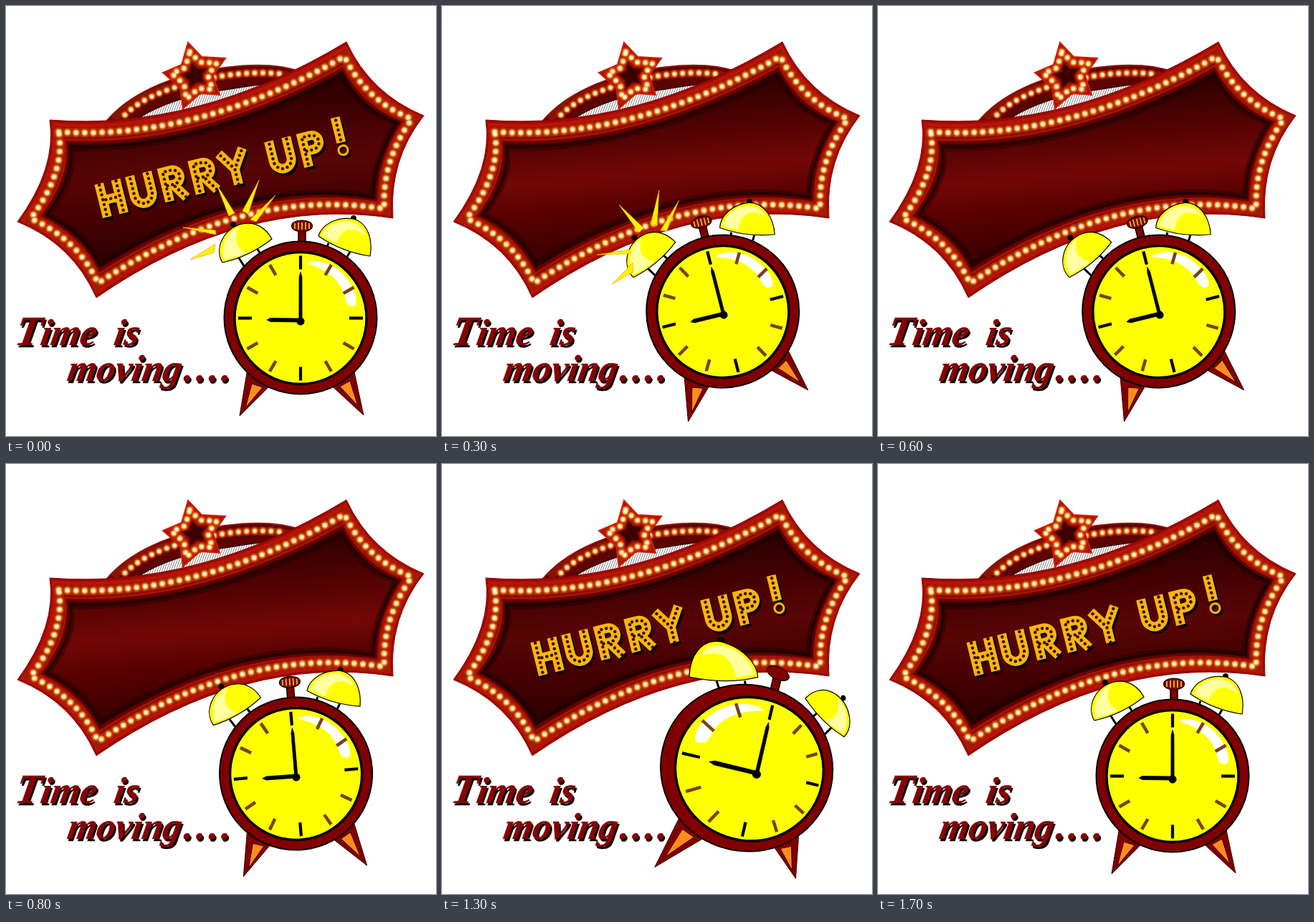
Animation of 600x600 px, one loop 1800 ms. Source, as an HTML page:

```html
<!DOCTYPE html>
<html lang="en">
<head>
<meta charset="utf-8">
<title>Hurry up</title>
<style>
html, body { margin: 0; width: 100%; height: 100%; overflow: hidden; background: #fff; }
svg { display: block; width: 100vw; height: 100vh; }
.script { font: italic bold 52px "Liberation Serif", serif; stroke-width: .5; }
.cap { font-size: 58px; }
</style>
</head>
<body>
<svg id="stage" viewBox="0 0 600 600">
  <defs>
    <linearGradient id="lit" x1="0.4" y1="0" x2="0.55" y2="1">
      <stop offset="0" stop-color="#240000"/>
      <stop offset=".3" stop-color="#500202"/>
      <stop offset=".52" stop-color="#730707"/>
      <stop offset=".7" stop-color="#560000"/>
      <stop offset="1" stop-color="#300000"/>
    </linearGradient>
    <linearGradient id="dim" x1="0.4" y1="0" x2="0.55" y2="1">
      <stop offset="0" stop-color="#220000"/>
      <stop offset=".3" stop-color="#440101"/>
      <stop offset=".5" stop-color="#580505"/>
      <stop offset=".7" stop-color="#460000"/>
      <stop offset="1" stop-color="#260000"/>
    </linearGradient>
    <pattern id="hatch" width="3" height="3" patternUnits="userSpaceOnUse" patternTransform="rotate(20)">
      <rect width="3" height="3" fill="#fff"/>
      <rect width="1" height="3" fill="#888"/>
    </pattern>
  </defs>
  <g id="sign"></g>
  <g id="word" role="img" aria-label="HURRY UP !" transform="translate(135.5 296) rotate(-14)"></g>
  <g id="caption"></g>
  <g id="clock" stroke-linejoin="round"></g>
</svg>
<script>
const $ = id => document.getElementById(id);
const path = (d, fill = 'none', stroke = 'none', w = 1, more = '') =>
  `<path d="${d}" fill="${fill}" stroke="${stroke}" stroke-width="${w}" ${more}/>`;

// A row of glowing lamps along a path
const lamps = (d, gap, size = 1) => [
  ['#d03c04', 14, .45], ['#ff7a14', 10.5, .55], ['#ffb050', 8, .85], ['#fff6d8', 5.4, 1]
].map(([c, w, o]) => path(d, 'none', c, w * size,
  `stroke-linecap="round" stroke-dasharray="0 ${gap}" opacity="${o}"`)).join('');

// Corner and control points of the board, outside and inside
const outer = [61,159, 268,175, 475,50, 508,122, 583,153, 534,215,
  540,296, 333,264, 126,407, 93,332, 16,301, 71,226];
const inner = [89,196, 268,203, 469,95, 495,146, 546,163, 512,218,
  513,267, 330,237, 131,362, 110,318, 57,291, 98,238];

function board(f) {
  const p = outer.map((v, i) => (v + (inner[i] - v) * f).toFixed(1));
  let d = `M${p[0]} ${p[1]}`;
  for (let i = 2; i < 24; i += 4)
    d += `Q${p[i]} ${p[i + 1]} ${p[(i + 2) % 24]} ${p[(i + 3) % 24]}`;
  return d + 'Z';
}

const starPts = [254,51, 273,71, 306,73, 289,97, 298,124, 271,122, 247,143, 243,114, 219,93, 245,82];
function star(f) {
  const p = starPts.map((v, i) => ((i % 2 ? 97 : 263) * (1 - f) + v * f).toFixed(1));
  return 'M' + p.join(' ') + 'Z';
}

function drawSign() {
  const arch = 'M140 161C170 125 225 97 305 86C350 80 385 82 412 92';
  $('sign').innerHTML =
    path(arch + 'L390 112L200 165Z', '#5c0402', '#980b04', 2) +
    path('M184 157C215 137 262 122 305 117C335 112 355 109 375 108C330 128 260 148 184 157Z',
      'url(#hatch)', '#360000', 1.5) +
    path('M150 158C185 121 235 107 305 97C340 92 370 92 398 98', 'none', '#861402', 11) +
    lamps('M166 152C192 126 235 110 305 97C335 93 360 92 386 95', 11.4, .9) +
    path(board(0), '#9c0a03', '#8a0400', 1) +
    path(board(.1), '#b91308') +
    path(board(.25), '#800d00') +
    path(board(.45), 'none', '#942203', 13) +
    lamps(board(.45), 12.1) +
    path(board(.74), '#660300', '#a81107', 3) +
    path(board(.9), '#3c0000') +
    path(board(1), 'url(#dim)', '#1c0000', 3) +
    path(board(1), 'url(#lit)', '#2a0000', 3, 'id="glow"') +
    path(board(1.1), 'none', '#1c0000', 5, 'opacity=".4"') +
    path(star(1), '#a80f04', '#cf1d0b', 2) +
    path(star(.7), 'none', '#a32604', 9) +
    lamps(star(.72), 11.2, .95) +
    path(star(.4), '#3c0000', '#7c0a02', 2);
}

function drawWord() {
  const u = x => `M${x}-48V-19A12.5 13 0 0 0 ${x + 25}-19V-48`;
  const bowl = x => `M${x} 0V-42h12a10 10 0 0 1 0 20h-12`;
  const r = x => bowl(x) + `M${x + 10}-22L${x + 24} 0`;
  const bang = 'M348-58V-22M349.5-11a1.5 1.5 0 1 1-3 0a1.5 1.5 0 1 1 3 0';
  const d = 'M6 0V-48M30 0V-48M6-24H30' + u(50) + r(96) + r(140) +
    'M178-48L195-22V0M212-48L195-22' + u(250) + bowl(296) + bang;
  $('word').innerHTML =
    path(d, 'none', '#0c0000', 13, 'transform="translate(2 4)"') +
    path(d, 'none', '#fdb50c', 13) +
    path(d, 'none', '#331000', 4.5,
      'stroke-linecap="round" stroke-dasharray="0 7" stroke-dashoffset="-4"');
}

function drawCaption() {
  const line = (x, y, s) => `<text transform="translate(${x} ${y}) skewX(-10)">${s}</text>`;
  const words = line(11, 473, '<tspan class="cap">T</tspan>ime') + line(149, 473, 'is') +
    line(84, 523, 'moving') + line(247, 523, '<tspan letter-spacing="4.5">....</tspan>');
  $('caption').innerHTML = [['#000', 2, 3], ['#850404', 0, 0]].map(([c, x, y]) =>
    `<g class="script" fill="${c}" stroke="${c}" transform="translate(${x} ${y})">${words}</g>`).join('');
}

// Closed round outline built from four curves
function oval(x, y, a, b = a) {
  const k = .5523, h = a * k, v = b * k;
  return `M${x - a} ${y} C${x - a} ${y - v} ${x - h} ${y - b} ${x} ${y - b} ` +
    `C${x + h} ${y - b} ${x + a} ${y - v} ${x + a} ${y} ` +
    `C${x + a} ${y + v} ${x + h} ${y + b} ${x} ${y + b} ` +
    `C${x - h} ${y + b} ${x - a} ${y + v} ${x - a} ${y}Z`;
}

const tick = i => {
  const a = i * Math.PI / 6, s = Math.sin(a), c = -Math.cos(a);
  const at = r => `${(411 + r * s).toFixed(2)} ${(435.5 + r * c).toFixed(2)}`;
  return i % 3 ? ['M' + at(69) + ' L' + at(86), 'none', '#75431a', 4.5]
               : ['M' + at(68) + ' L' + at(87), 'none', '#000', 4.2];
};

const red = '#800000', ink = '#000', sun = '#ffff00';
const body = [
  ['M324 350 L334 366 M350 338 L358 350 M450 331 L444 346 M480 343 L473 355', 'none', ink, 3],
  [oval(317, 305, 4), ink],
  [oval(485, 296, 4), ink],
  ['M302 358 C290 338 304 310 330 304 C350 300 364 312 371 325 Q341 349 302 358Z', sun, ink, 1.2],
  ['M304 354 C299 331 311 313 326 308 C316 324 322 339 336 344 Q320 351 304 354Z', '#ffffa0'],
  ['M436 321 C441 304 462 294 484 297 C505 302 512 326 508 349 Q468 343 436 321Z', sun, ink, 1.2],
  ['M441 320 C448 305 462 299 480 301 C494 305 500 312 502 322 C488 308 470 306 461 331 Z', '#ffffa0'],
  ['M408 312 L418 312 L418 332 L408 332Z', red, ink, 1.5],
  [oval(413, 307, 14.5, 8), red, ink, 1.2],
  ['M337 506 L374 524 L326 572Z', red, '#300', 1],
  ['M343 527 L358 532 L334 561Z', '#ff8c1a', '#300', 1],
  ['M448 524 L485 506 L499 571Z', red, '#300', 1],
  ['M466 531 L480 523 L491 558Z', '#ff8c1a', '#300', 1],
  [oval(411, 435, 106.5), red, ink, 2],
  [oval(411, 435.5, 92), sun, ink, 3.4],
  ['M422 357 C450 352 476 373 487 400 C490 412 489 420 483 419 C474 418 475 412 471 400 ' +
   'C464 380 444 366 422 360Z', '#fff'],
  ...Array.from({ length: 12 }, (_, i) => tick(i))
];
const ridges = ['M403 303 L403 311 M408 302 L408 312 M413 302 L413 312 M418 302 L418 312 M423 303 L423 311',
  'none', '#e8b830', 1.8];
const minute = ['M408.8 440 L409 378 L411 371 L413 378 L413.2 440Z', ink, ink, .6];
const hour = ['M411 441 L369 440.5 L364 438 L369 435.5 L411 436Z', ink, ink, .8];
const sparks = [
  [308,255, 325,299, 333,295], [367,249, 344,292, 352,296], [390,270, 355,304, 363,307],
  [261,315, 306,319, 307,325], [271,360, 306,338, 304,350]
];

// Swing runs 0 to -4 and back, then 0 to 4 and back; the ends show the clock turned
function swing(i) {
  return i < 9 ? -Math.min(i, 9 - i) : Math.min(i - 9, 17 - i);
}

function projector(n) {
  const turned = Math.abs(n) === 4, flip = n === 4 ? -1 : 1;
  const deg = turned ? -13 : n * 4.8, a = deg * Math.PI / 180;
  const k = turned ? .0012 : 0, zoom = turned ? 1.08 : 1, wide = turned ? 1.03 : 1;
  const c = Math.cos(a), s = Math.sin(a);
  const cx = turned ? (n < 0 ? 384 : 439) : 411 + (n < 0 ? 6 : 3.9) * n;
  const cy = turned ? (n < 0 ? 428 : 433) : 440 - (n < 0 ? 3 : 3.5) * Math.abs(n);
  return (d, sx = 1) => d.replace(/(-?[\d.]+) (-?[\d.]+)/g, (_, px, py) => {
    let x = (px - 411) * sx, y = py - 440;
    const g = zoom / (1 - k * x);
    x *= g * wide;
    y *= g;
    return (cx + flip * (x * c - y * s)).toFixed(2) + ' ' + (cy + x * s + y * c).toFixed(2);
  });
}

function drawClock(i) {
  const n = swing(i), to = projector(n), turned = Math.abs(n) === 4;
  const put = ([d, ...style], sx) => path(to(d, sx), ...style);
  let out = body.map(p => put(p)).join('');
  if (!turned) out += put(ridges);
  out += put(hour, n === 4 ? -1.22 : 1) + put(minute, n === 4 ? -1 : 1) + put([oval(411, 440, 5.5), ink]);
  if (i < 5) {
    const lag = Math.max(0, 1 - i / 2);
    for (const p of sparks) {
      const q = p.map((v, j) => v - lag * (j % 2 ? 6 : 14));
      out += put([`M${q[0]} ${q[1]} L${q[2]} ${q[3]} L${q[4]} ${q[5]}Z`, '#fff000', '#e6b400', .8]);
    }
  }
  $('clock').innerHTML = out;
}

let last = -1;
function render(ms) {
  const i = Math.floor(ms % 1800 / 100);
  if (i !== last) {
    last = i;
    const on = i === 0 || i > 9;
    $('word').style.display = on ? '' : 'none';
    $('glow').style.display = on ? 'none' : '';
    drawClock(i);
  }
}

drawSign();
drawWord();
drawCaption();
render(0);
const start = performance.now();
(function loop() {
  render(performance.now() - start);
  requestAnimationFrame(loop);
})();
</script>
</body>
</html>
```
